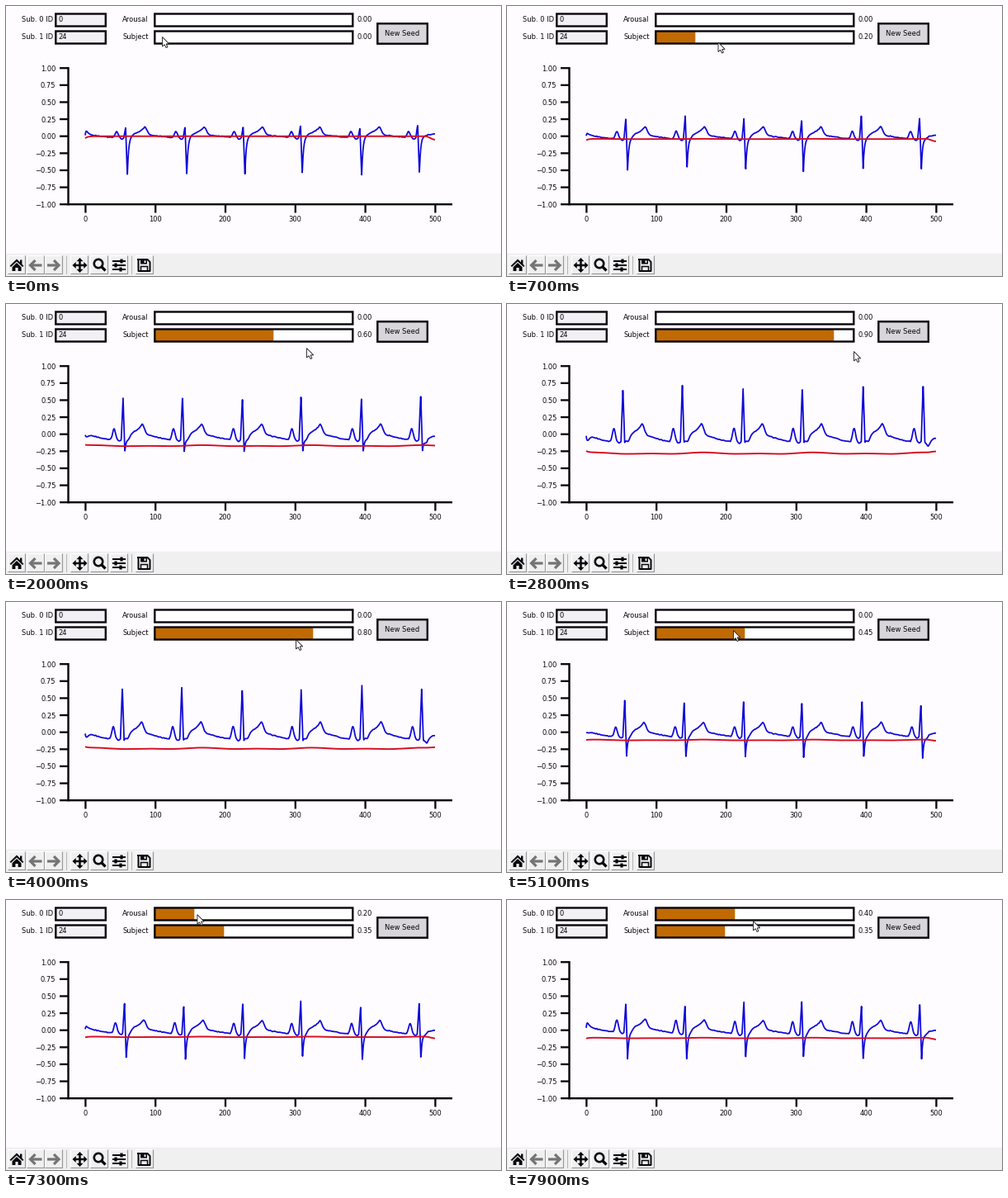
These frames come from a looping animation (600 px wide and 327 px high, 8 s). A matplotlib script:

```python
import numpy as np
import matplotlib.pyplot as plt
from matplotlib.animation import FuncAnimation
from matplotlib.patches import Circle, Polygon, Rectangle

W, H, DPI = 600, 327, 100
FRAMES, INTERVAL = 80, 100
PX = 72 / DPI  # one pixel in points
INK = "#08060c"
PAPER = "#fefcff"
BAR = "#f0f0f0"
ORANGE = "#c26a02"
TRACK_X, TRACK_W = 180.3, 240

plt.rcParams["font.family"] = "DejaVu Sans"
fig = plt.figure(figsize=(W / DPI, H / DPI), dpi=DPI, facecolor=PAPER)
ax = fig.add_axes([0, 0, 1, 1])
ax.set_xlim(0, W)
ax.set_ylim(H, 0)
ax.axis("off")


def line(xs, ys, width=1.0, color=INK, cap="butt", **kw):
    return ax.plot(xs, ys, color=color, lw=width * PX, solid_capstyle=cap,
                   snap=False, **kw)[0]


def rect(x0, y0, x1, y1, fill="none", edge="none", width=0.0, z=1):
    return ax.add_patch(Rectangle((x0, y0), x1 - x0, y1 - y0, fc=fill, ec=edge, snap=False,
                                  lw=width * PX, joinstyle="miter", zorder=z))


def poly(points, color=INK):
    return ax.add_patch(Polygon(points, fc=color, ec="none", zorder=3))


def label(x, y, text, ha="left", va="center"):
    return ax.text(x, y, text, ha=ha, va=va, fontsize=6, color=INK, zorder=4)


# ---- Plot frame -----------------------------------------------------------
def px(x):
    return 96 + 0.848 * x


def py(v):
    return 157.7 - 82.5 * v


def draw_axes():
    line([75.5, 75.5], [py(1), py(-1)], 2.4, cap="projecting")
    line([75.5, 541], [py(-1)] * 2, 2.4)
    for v in np.linspace(-1, 1, 9):
        y = py(v)
        line([65, 75], [y, y], 2.3)
        label(60.5, y, f"{v:.2f}".replace("-", "\u2212"), "right", "center_baseline")
    for v in range(0, 501, 100):
        line([px(v) + .4] * 2, [240, 250.5], 2.3)
        label(px(v), 257.5, str(v), "center", "center_baseline")


# ---- Controls -------------------------------------------------------------
def text_box(y, name, value):
    rect(60.3, y, 120.8, y + 15, "#f2f0f4", INK, 2.4)
    label(57, y + 7, name, "right")
    label(63, y + 7, value)


def slider(y, name):
    rect(TRACK_X, y, TRACK_X + TRACK_W, y + 15, "white")
    fill = rect(TRACK_X, y, TRACK_X, y + 15, ORANGE, z=2)
    rect(TRACK_X, y, TRACK_X + TRACK_W, y + 15, "none", INK, 2.4, z=3)
    label(172.5, y + 7, name, "right")
    return fill, label(425, y + 7, "0.00")


def set_slider(parts, value):
    fill, text = parts
    fill.set_width(TRACK_W * value)
    text.set_text(f"{value:.2f}")


# ---- Toolbar --------------------------------------------------------------
def tool_button(x):
    line([x, x, x + 21], [324.5, 302.5, 302.5], 1, "white")
    line([x, x + 21, x + 21], [324.5, 324.5, 302.5], 1.2, "#989898")


def arrow_icon(x, way):
    gray = "#747474"
    line([x, x - 6 * way, x], [308, 314, 320], 3.2, gray, solid_joinstyle="miter")
    line([x - 5 * way, x + 8 * way], [314, 314], 3.2, gray)


def home_icon(x, y):
    for side in (-1, 1):
        poly([(x, y - 7.5), (x, y - 4.5), (x + 7 * side, y + 2), (x + 8.5 * side, y + .8)])
    rect(x + 4, y - 6.5, x + 6.4, y - 1, INK, z=3)
    poly([(x, y - 3), (x + 5.5, y + 2.3), (x + 5.5, y + 7), (x - 5.5, y + 7),
          (x - 5.5, y + 2.3)])
    rect(x - 1.6, y + 3, x + 1.6, y + 7, BAR, z=4)


def pan_icon(x, y):
    line([x - 6, x + 6], [y, y], 2.5)
    line([x, x], [y - 6, y + 6], 2.5)
    for dx, dy in ((1, 0), (-1, 0), (0, 1), (0, -1)):
        poly([(x + 9 * dx, y + 9 * dy),
              (x + 4.8 * dx + 4 * dy, y + 4.8 * dy + 4 * dx),
              (x + 4.8 * dx - 4 * dy, y + 4.8 * dy - 4 * dx)])


def zoom_icon(x, y):
    ax.add_patch(Circle((x, y), 5.2, fc="none", ec=INK, lw=2.6 * PX, zorder=3))
    line([x + 3.5, x + 8.5], [y + 3.5, y + 8.5], 3.3)


def settings_icon(x, y):
    for dy, knob in ((-5, 3), (0, -4), (5, 2)):
        line([x - 8, x + 8], [y + dy] * 2, 2)
        rect(x + knob - 1.6, y + dy - 2.5, x + knob + 1.6, y + dy + 2.5, INK, z=3)


def save_icon(x, y):
    line([x - 7, x + 4, x + 7, x + 7, x - 7, x - 7],
         [y - 7, y - 7, y - 4, y + 7, y + 7, y - 7], 2, cap="projecting")
    rect(x - 4.5, y - 7, x + 3.5, y - 1.5, INK, z=3)
    rect(x, y - 5.6, x + 2, y - 3, BAR, z=4)
    rect(x - 4, y + 1.5, x + 4, y + 7, "none", INK, 1.5, z=3)


def draw_toolbar():
    rect(0, 299.7, W, H, BAR)
    for x in (2.5, 25.5, 47.5, 78.5, 102.5, 126.5, 157.5):
        tool_button(x)
    for x in (73.5, 152.5):
        line([x, x], [303, 325], 1, "#b4b4b4")
    home_icon(13, 314)
    arrow_icon(35.5, 1)
    arrow_icon(58, -1)
    pan_icon(89.5, 314)
    zoom_icon(112, 312)
    settings_icon(137, 314)
    save_icon(167.5, 314)


# ---- Signals --------------------------------------------------------------
X = np.linspace(px(0), px(500), 1700)
START = np.array([145, 217, 287.5, 357, 429, 499])  # beats at subject 0
END = np.array([140, 212, 286, 358, 432, 505])      # beats at subject 1
PERIOD = 72

rng = np.random.default_rng(4)
PHASE = rng.uniform(0, 2 * np.pi, START.size)
NOISE = np.interp(X, np.linspace(X[0], X[-1], 300), rng.normal(0, 1, 300))


def smooth(u):
    u = np.clip(u, 0, 1)
    return u * u * (3 - 2 * u)


def bell(d, center, width):
    return np.exp(-((d - center) / width) ** 2 / 2)


def heartbeat(s, a):
    k = a / .4
    centers = START + (END - START) * s + k * np.linspace(.8, -.7, START.size)
    beat = np.clip(np.searchsorted(centers - 15, X) - 1, 0, None)
    d = X - centers[beat]
    head, tail = X - X[0], smooth((X - 503) / 6)

    # slow waves: resting level, P wave, T wave
    sag = smooth((d % PERIOD - 25) / 32) + (d >= 0) * (1 - smooth((d - 2) / 12))
    rest = .015 - .04 * s - (.03 + .06 * s) * sag
    rest += .035 * k * np.clip(1 - head / 200, 0, 1) - .06 * s * tail
    p_wave = (.08 + .12 * s + .05 * k) * bell(d, -11, 1.7)
    t_wave = np.where(d < 23, np.exp((d - 23) / 8), bell(d, 23, 2.8))
    t_wave *= (.12 + .06 * s) * (1 - .8 * tail)
    dips = .03 * bell(d, -4.5, 1.8) + .05 * s * bell(d, 6.5, 1.5)
    onset = (.06 - .14 * s + .06 * k) * head / 1.5 * np.exp(1 - head / 1.5)
    slow = rest + p_wave + t_wave - dips + onset + .003 * NOISE

    # sharp spike up, spike down and recovery
    wobble = np.sin(PHASE + 20 * s)[beat]
    peak = .14 + .78 * s - .17 * s * s + .04 * wobble
    dip = np.interp(s, (0, .4, .8), (-.57, -.41, -.12)) + .03 * (1 - s) * wobble
    rise = slow + (peak - slow) * (1 + d / 2.3)
    fall = peak + (dip - peak) * d / 2.1
    back = slow + (dip - slow) * np.exp(-np.clip(d - 2.1, 0, None) / 1.5)
    return py(np.select([d < -2.3, d < 0, d < 2.1], [slow, rise, fall], back))


def baseline(s, a):
    level = -.2 * s - .125 * s * s - .075 * a
    turn = 2 * np.pi * (X - 238)
    wave = s * (.009 * np.cos(turn / 134) + .007 * np.cos(turn / 66))
    start = (.06 * s - .03) * np.exp((X[0] - X) / 3)
    end = (.08 * s - .05) * smooth((X - 508) / 12)
    return py(level + wave + start + end)


# ---- Timeline -------------------------------------------------------------
CURSOR = np.array([(0, 0), (0, 11.5), (2.6, 9.2), (4.6, 13), (6.4, 12.2),
                   (4.7, 8.4), (8.2, 8.4)]) + .5
# time in seconds, then the value or place at that time
PATH = ((0, 189, 37), (1.4, 322, 50), (2.8, 420, 57), (3.2, 425, 55), (4.0, 351, 45),
        (5.1, 274, 34), (5.4, 261, 35), (6.1, 261, 36), (6.4, 192, 10), (6.9, 187, 12),
        (7.9, 298, 25))
SUBJECT = ((.1, 0), (1.4, .40), (2.8, .90), (3.1, 1), (3.4, 1), (4.0, .80),
           (5.1, .45), (5.4, .37), (5.8, .35))
AROUSAL = ((6.9, 0), (7.75, .40))


def at(t, keys):
    times, *tracks = zip(*keys)
    return [np.interp(t, times, track) for track in tracks]


def snap(value):
    return round(value * 20) / 20


draw_axes()
draw_toolbar()
text_box(9.5, "Sub. 0 ID", "0")
text_box(30.5, "Sub. 1 ID", "24")
arousal_slider = slider(9.5, "Arousal")
subject_slider = slider(30.5, "Subject")
rect(450.3, 21.3, 510.8, 45.7, "#d8d6da", INK, 2.4)
label(480, 33, "New Seed", "center")
blue = line(X, X, 1.75, "#0f08d8", zorder=5, solid_joinstyle="round")
red = line(X, X, 1.9, "#d80a20", zorder=6, solid_joinstyle="round")
cursor = ax.add_patch(Polygon(CURSOR, fc="white", ec="#202020", lw=.9 * PX, zorder=9))


def draw(i):
    t = i * INTERVAL / 1000
    s, = at(t, SUBJECT)
    a, = at(t, AROUSAL)
    set_slider(subject_slider, snap(s))
    set_slider(arousal_slider, snap(a))
    blue.set_ydata(heartbeat(s, a))
    red.set_ydata(baseline(s, a))
    cursor.set_xy(CURSOR + at(t, PATH))
    return blue, red, cursor


anim = FuncAnimation(fig, draw, frames=FRAMES, interval=INTERVAL, repeat=True,
                     repeat_delay=0)
plt.show()
```
